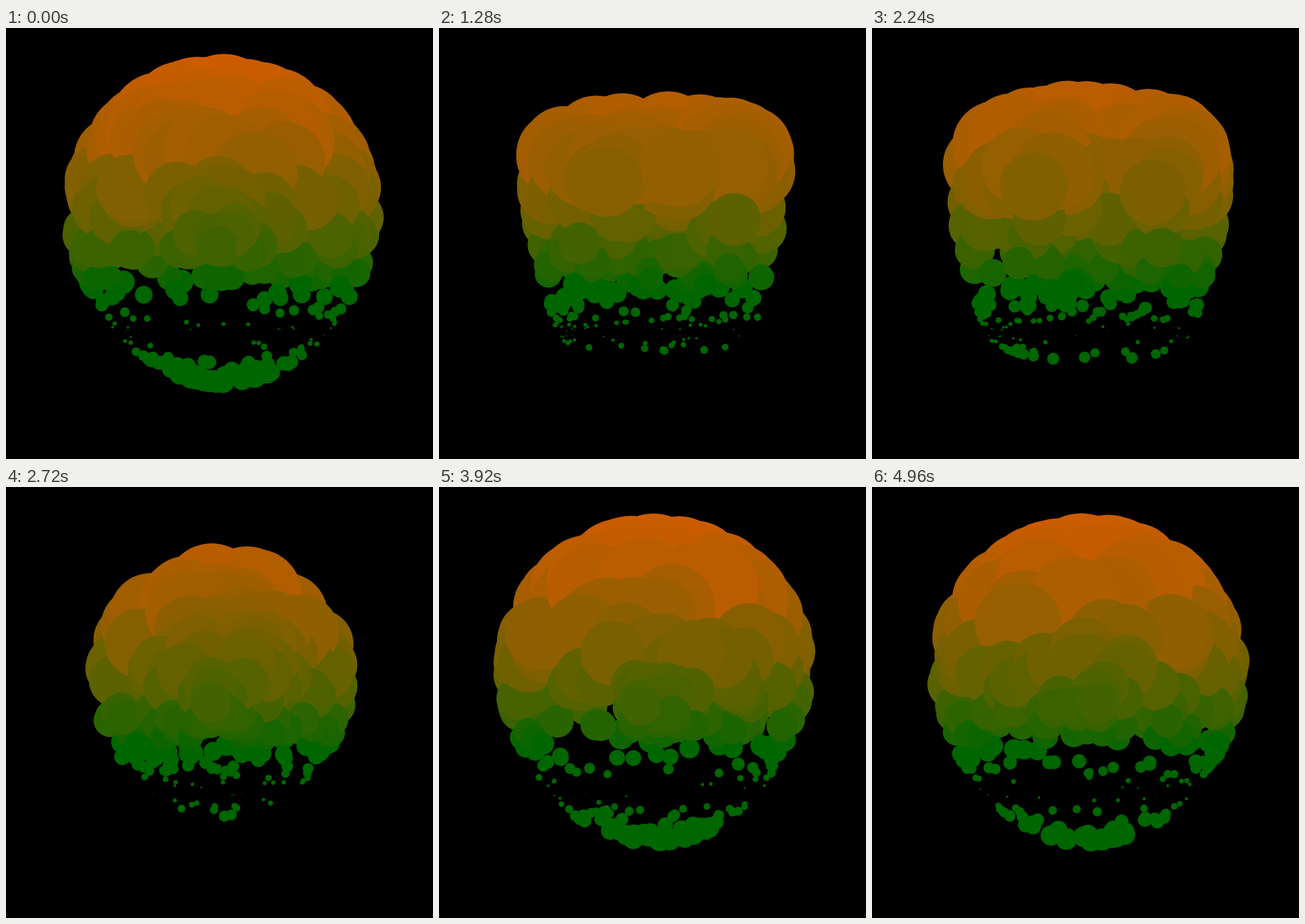
An HTML page with a canvas for the animation above (5040 ms loop, 745x752 px).

```html
<!DOCTYPE html>
<html>
<head>
<meta charset="utf-8">
<title>Dot sphere</title>
<style>
html, body { margin: 0; width: 100%; height: 100%; overflow: hidden; background: #000; }
canvas { display: block; }
</style>
</head>
<body>
<canvas id="stage" width="745" height="752"></canvas>
<script>
const ctx = document.getElementById('stage').getContext('2d');
const STEP = 80, STEPS = 63, SPEED = 0.25;
const CENTER = 377, RADIUS = 240, VANISH_Y = 532;
const DOTS = 340, TAU = 2 * Math.PI;
const GOLDEN_ANGLE = Math.PI * (3 - Math.sqrt(5));

let seed = 20;
function random() {
  seed = (seed * 1664525 + 1013904223) % 4294967296;
  return seed / 4294967296;
}

// Even spread around the stage centre, denser towards the rim.
const dots = Array.from({ length: DOTS }, (_, i) => {
  const w = random() * TAU;
  return { u: i * GOLDEN_ANGLE, v: w - 0.27 * Math.sin(2 * w) };
});

const smooth = k => k * k * (3 - 2 * k);

// The cloud breathes between a wide ball, a barrel and a small ball.
function shapeAt(angle) {
  const a = angle + 0.08;
  const fold = Math.sin(a) ** 2;
  return {
    round: 1 - 0.3 * smooth(fold),
    square: 0.32 * Math.sin(2 * a) + 0.42 * fold
  };
}

function colorAt(y) {
  const red = 2.66 * Math.pow(Math.max(0, 445 - y), 0.758);
  return `rgb(${Math.round(red)},${Math.round(102 - red * 0.049)},0)`;
}

function place({ u, v }, angle, { round, square }) {
  const depth = Math.sin(v + angle);
  const c = round * Math.cos(v + angle);
  const s = square * depth;
  return {
    x: CENTER + RADIUS * (c * Math.cos(u) - s * Math.sin(u)),
    y: CENTER + RADIUS * (c * Math.sin(u) - s * Math.cos(u)),
    depth
  };
}

function draw(step) {
  const angle = step * SPEED;
  const shape = shapeAt(angle);
  const placed = dots.map(dot => place(dot, angle, shape));
  placed.sort((a, b) => a.depth - b.depth);

  ctx.fillStyle = '#000';
  ctx.fillRect(0, 0, 745, 752);
  for (const { x, y } of placed) {
    ctx.fillStyle = colorAt(y);
    ctx.beginPath();
    ctx.arc(x, y, Math.abs(VANISH_Y - y) * 0.2325, 0, TAU);
    ctx.fill();
  }
}

const start = performance.now();
function tick() {
  draw(Math.floor((performance.now() - start) / STEP) % STEPS);
  requestAnimationFrame(tick);
}
tick();
</script>
</body>
</html>
```
